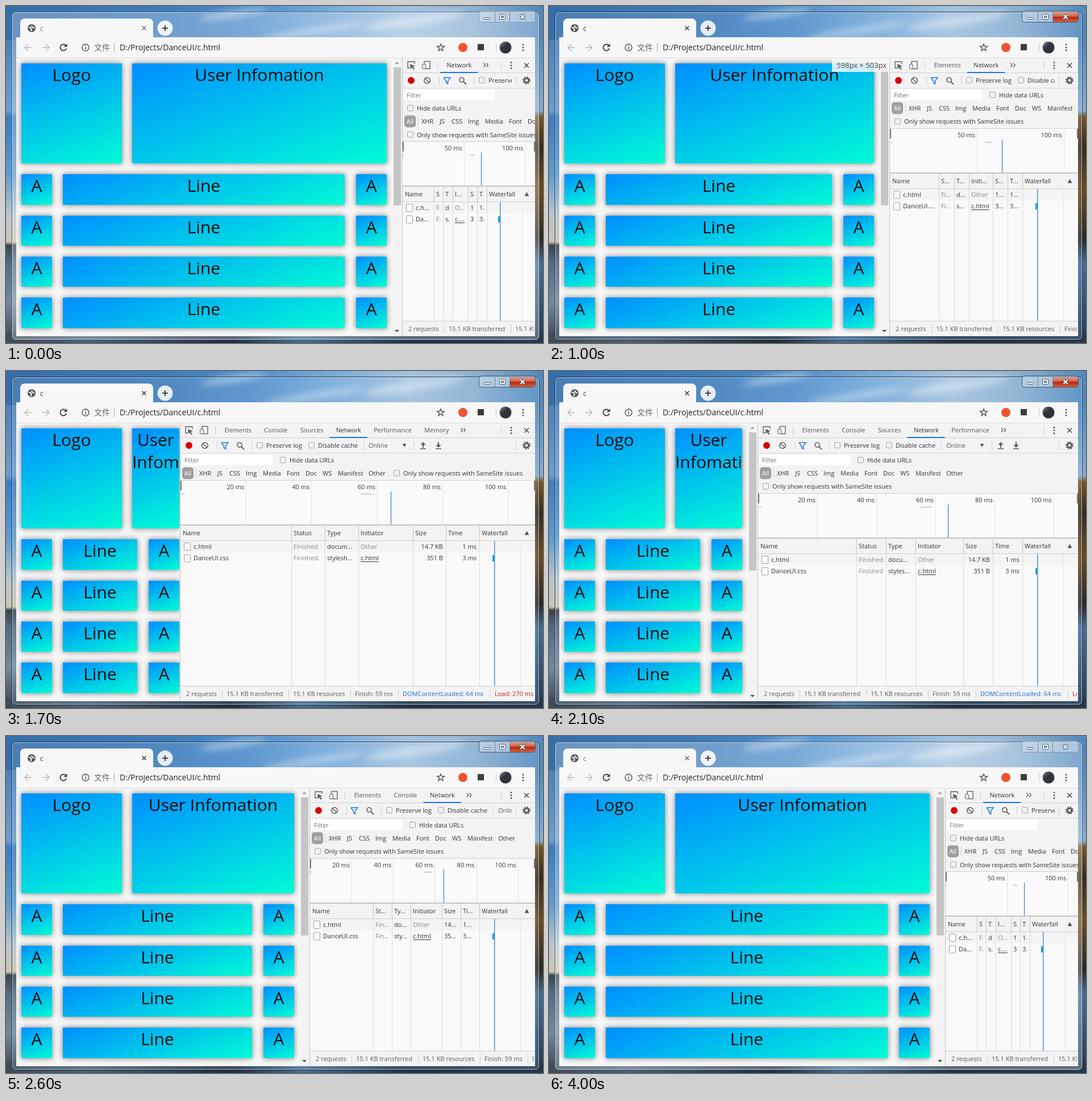
Animation of 945 by 593 pixels, one loop 4.1 s. Source, as an HTML page with a canvas:

```html
<!DOCTYPE html>
<html lang="en">
<head>
<meta charset="utf-8">
<title>c</title>
<style>
html, body { margin: 0; width: 100%; height: 100%; overflow: hidden; }
canvas { display: block; }
</style>
</head>
<body>
<canvas id="stage" width="945" height="593"></canvas>
<script>
const c = document.getElementById('stage').getContext('2d');
const FONT = '"Open Sans", "Noto Sans", "Noto Sans CJK SC", sans-serif';
const RIGHT = 931, BOTTOM = 581, REST = 698;

// Splitter position for every 100 ms of the drag, which begins at 600 ms.
const DRAG = [698, 698, 696, 668, 600, 440, 333, 317, 309, 306, 305, 307, 312,
  322, 342, 368, 396, 426, 459, 495, 535, 584, 632, 674, 692, 698];

function rect(x, y, w, h, color) {
  c.fillStyle = color;
  c.fillRect(x, y, w, h);
}
const vline = (x, y1, y2, color = '#ccc') => rect(Math.round(x), y1, 1, y2 - y1, color);

function round(x, y, w, h, r, fill, stroke) {
  c.beginPath();
  c.roundRect(x, y, w, h, r);
  if (fill) { c.fillStyle = fill; c.fill(); }
  if (stroke) { c.strokeStyle = stroke; c.lineWidth = 1; c.stroke(); }
}

function disc(x, y, r, fill) {
  c.beginPath();
  c.arc(x, y, r, 0, 7);
  c.fillStyle = fill;
  c.fill();
}

function ring(x, y, r, color, width = 1.5, from = 0, to = 2 * Math.PI) {
  c.beginPath();
  c.arc(x, y, r, from, to);
  c.strokeStyle = color;
  c.lineWidth = width;
  c.stroke();
}

// Polyline through x, y pairs given relative to an origin.
function path(x, y, pts, color, width) {
  c.beginPath();
  for (let i = 0; i < pts.length; i += 2) c.lineTo(x + pts[i], y + pts[i + 1]);
  if (width) { c.strokeStyle = color; c.lineWidth = width; c.stroke(); }
  else { c.fillStyle = color; c.fill(); }
}

function cross(x, y, r, color, width = 1.5) {
  path(x, y, [-r, -r, r, r], color, width);
  path(x, y, [-r, r, r, -r], color, width);
}

const dots = (x, y, color) => [-5, 0, 5].forEach(d => disc(x, y + d, 1.5, color));

function setFont(size) { c.font = `${size}px ${FONT}`; }

// y is the middle of the capitals.
function text(s, x, y, color = '#333', size = 11, align = 'left') {
  setFont(size);
  c.textAlign = align;
  c.fillStyle = color;
  c.fillText(s, x, Math.round(y + size * .36));
}

function width(s, size = 11) {
  setFont(size);
  return c.measureText(s).width;
}

function clip(x, y, w, h, draw) {
  c.save();
  c.beginPath();
  c.rect(x, y, w, h);
  c.clip();
  draw();
  c.restore();
}

function blend(x0, y0, x1, y1, stops) {
  const g = c.createLinearGradient(x0, y0, x1, y1);
  for (const [at, color] of stops) g.addColorStop(at, color);
  return g;
}

function check(x, y, label) {
  round(x - 4.5, y - 5.5, 10, 10, 2, '#f1f1f1', '#a0a0a0');
  text(label, x + 12, y);
}

/* Desktop and window frame */

function desktop() {
  rect(0, 0, 945, 593, blend(0, 0, 0, 593, [[0, '#3c74af'], [.31, '#6b9ecf'], [.33, '#3a7dbf'],
    [.5, '#5f9cd0'], [.62, '#b9c6cb'], [.7, '#cdc5ae'], [.71, '#3a434d'], [.76, '#526b82'],
    [.88, '#75899a'], [1, '#33414f']]));
  rect(0, 0, 945, 60, blend(0, 0, 945, 0, [[0, '#346eab'], [.3, '#3f7cba'], [.45, '#4d8cca'],
    [.6, '#76a9d8'], [.75, '#a3c3de'], [.88, '#8aafd0'], [1, '#5087bd']]));
  rect(925, 55, 20, 538, blend(0, 55, 0, 593, [[0, '#5088be'], [.24, '#86aed2'], [.26, '#7d5522'],
    [.36, '#3a2a18'], [.5, '#6f4b20'], [.66, '#2b2820'], [.74, '#456f98'], [1, '#23394f']]));
  rect(0, 575, 945, 18, blend(0, 0, 945, 0, [[0, '#3d4b58'], [.15, '#4b6074'], [.34, '#2a3c4e'],
    [.42, '#1f2e3f'], [.55, '#466d90'], [.75, '#1f3145'], [1, '#26394c']]));
  c.save();
  c.filter = 'blur(6px)';
  c.fillStyle = 'rgba(255,255,255,.4)';
  for (const [x, y, rx, ry] of [[400, 14, 60, 7], [540, 44, 90, 6], [720, 26, 90, 10]]) {
    c.beginPath();
    c.ellipse(x, y, rx, ry, -.15, 0, 7);
    c.fill();
  }
  c.restore();
}

function frame(active) {
  round(10.5, 10.5, 928, 577, 7, active ? 'rgba(190,215,240,.15)' : 'rgba(235,243,250,.28)',
    active ? '#1e2e40' : '#4a5d70');
  round(11.5, 11.5, 926, 575, 6, null, 'rgba(255,255,255,.6)');
  round(832.5, 8.5, 99, 20, 4, 'rgba(225,236,246,.45)', active ? '#43566a' : '#8497aa');
  if (active) round(887, 11, 44, 17, [0, 0, 4, 0],
    blend(0, 11, 0, 28, [[0, '#e2a090'], [.45, '#cf5a42'], [.5, '#b5260f'], [1, '#d5603f']]));
  vline(860, 11, 28, '#71859a');
  vline(886, 11, 28, '#71859a');
  round(841.5, 20.5, 11, 3, 1, '#fff', '#4a5562');
  round(868.5, 14.5, 10, 9, 1, '#fff', '#4a5562');
  round(871.5, 17.5, 4, 3, 0, '#9cb2c8', '#4a5562');
  cross(909, 19, 4, '#4a5562', 4);
  cross(909, 19, 3.5, '#fff', 2.2);
}

function browserBar(active) {
  const ink = '#50545a', soft = '#bcbec1';
  round(25, 22, 234, 40, [8, 8, 0, 0], '#f7f7f7');
  rect(18, 55, 913, 37, '#f7f7f7');
  rect(18, 91, 913, 1, '#dcdcdc');

  disc(45, 39, 7, ink);
  path(45, 39, [-5, -2, -1, 0, 0, 3, -2, 5], '#f7f7f7', 2);
  path(45, 39, [0, -5, 1, -2, 5, 0], '#f7f7f7', 2);
  text('c', 60, 40, active ? '#333' : '#777', 12);
  cross(243, 39, 3.5, active ? '#333' : '#666');
  disc(280, 39, 13.5, active ? '#e6edf4' : '#f0f4f8');
  path(280, 39, [-5, 0, 5, 0], '#333', 1.8);
  path(280, 39, [0, -5, 0, 5], '#333', 1.8);

  for (const [x, d] of [[39, -1], [70, 1]]) {
    path(x, 73, [-6 * d, 0, 6 * d, 0], soft, 1.7);
    path(x, 73, [0, -6, 6 * d, 0, 0, 6], soft, 1.7);
  }
  ring(101, 73, 5.5, '#444', 1.9, .3, 5.4);
  path(101, 73, [6.5, -7, 6.5, -1, .5, -1], '#444');
  ring(140, 73, 6, ink, 1.4);
  rect(139.3, 72, 1.5, 4.5, ink);
  rect(139.3, 69.3, 1.5, 1.6, ink);
  text('文件', 155, 73, '#666', 14);
  vline(190, 65, 81, '#aaa');
  text('D:/Projects/DanceUI/c.html', 200, 73, '#222', 14);

  const star = [];
  for (let i = 0; i <= 10; i++) {
    const r = i % 2 ? 2.8 : 6.8, a = i * Math.PI / 5 - Math.PI / 2;
    star.push(r * Math.cos(a), r * Math.sin(a));
  }
  path(765, 73, star, ink, 1.4);
  disc(804, 73, 8, '#f0522f');
  rect(830, 67, 11, 11, '#3c3c3c');
  vline(862, 65, 81);
  disc(879, 73, 10.5, blend(870, 63, 888, 83, [[0, '#6f7d88'], [.4, '#30363e'], [1, '#2a3038']]));
  dots(910, 73, ink);
}

/* Web page */

function card(x, y, w, h, label) {
  const cx = x + w / 2, cy = y + h / 2, sin = .342, cos = .94;
  const half = (w * sin + h * cos) / 2;
  c.save();
  c.shadowColor = 'rgba(0,0,0,.5)';
  c.shadowBlur = 10;
  rect(x, y, w, h, blend(cx - sin * half, cy - cos * half, cx + sin * half, cy + cos * half,
    [[0, '#008eff'], [1, '#00fcd6']]));
  c.restore();
  const lines = width(label, 30) > w ? label.split(' ') : [label];
  clip(x, y, w, h, () => lines.forEach((line, i) => {
    const fits = width(line, 30) <= w;
    text(line, fits ? cx : x, y + 20.2 + 39 * i, '#0a0a0a', 30, fits ? 'center' : 'left');
  }));
}

function sizeLabel(split) {
  const size = [split - 18, BOTTOM - 92].map(n => Math.round(n * 1.028) + 'px').join(' × ');
  rect(split - 102, 92, 100, 24, 'rgba(247,247,247,.85)');
  text(size, split - 6, 104.5, '#444', 13, 'right');
}

function page(split, resizing) {
  const end = Math.max(split, 333);
  rect(18, 92, split - 18, BOTTOM - 92, '#f7f7f7');
  clip(18, 92, split - 19, BOTTOM - 92, () => {
    card(27, 101, 177, 176, 'Logo');
    card(222, 101, end - 250, 176, 'User Infomation');
    for (let i = 0; i < 4; i++) {
      const exact = 296.3 + 72.3 * i;
      const y = Math.round(exact), h = Math.round(exact + 53.5) - y;
      card(27, y, 54, h, 'A');
      card(100, y, end - 202, h, 'Line');
      card(end - 82, y, 54, h, 'A');
    }
    rect(end - 17, 92, 17, BOTTOM - 92, '#f3f3f3');
    rect(end - 16, 108, 13, 243, '#c5c5c5');
    path(end - 10, 100, [-4, 2, 0, -2, 4, 2], '#a3a3a3');
    path(end - 10, 572, [-4, -2, 0, 2, 4, -2], '#505050');
    if (resizing) sizeLabel(split);
  });
}

/* Network panel */

function tabBar(P, W) {
  const ink = '#5a5a5a';
  path(P + 15, 104, [6, -2, 6, -6, -6, -6, -6, 5, -2, 5], ink, 1.3);
  path(P + 15, 104, [-2, -2, 7, 2, 3, 3, 6, 7, 4, 8, 1, 4, -1, 7], ink);
  c.strokeStyle = ink;
  c.lineWidth = 1.3;
  c.strokeRect(P + 38, 97.5, 10, 13);
  round(P + 34.5, 102.5, 6, 8, 1, '#f3f3f3', ink);
  vline(P + 61, 97, 112);

  const all = ['Elements', 'Console', 'Sources', 'Network', 'Performance', 'Memory'];
  const size = s => width(s) + 22.5;
  let room = W - 165 - size('Network'), open = true, x = P + 66;
  for (const name of all) {
    const w = size(name), current = name === 'Network';
    if (!current) {
      open = open && w <= room;
      if (!open) continue;
      room -= w;
    }
    text(name, x + 11.5, 104.5, current ? '#333' : '#555');
    if (current) rect(x, 116, w, 2, '#1a73e8');
    x += w;
  }
  for (const d of [-4, 1]) path(x + 14 + d, 104, [0, -3.5, 3, 0, 0, 3.5], ink, 1.3);
  vline(871, 97, 112);
  dots(889, 104.5, ink);
  cross(916, 104.5, 4, '#444');
}

function toolBar(P) {
  const ink = '#5a5a5a', y = 131;
  disc(P + 15, y, 6, '#d90000');
  ring(P + 43, y, 5.3, ink, 1.6);
  path(P + 43, y, [-3.7, -3.7, 3.7, 3.7], ink, 1.6);
  path(P + 78, y, [-6, -5, 6, -5, 1.5, 1, 1.5, 6, -1.5, 4, -1.5, 1, -6, -5], '#1a73e8', 1.5);
  ring(P + 104, y - 1, 4, ink, 1.6);
  path(P + 107, y + 2, [0, 0, 5, 5], ink, 1.8);
  for (const d of [64, 125, 322, 411]) vline(P + d, 124, 139);
  clip(P, 118, 890 - P, 27, () => {
    check(P + 139, y, 'Preserve log');
    check(P + 230, y, 'Disable cache');
    text('Online', P + 331, y, '#555');
    path(P + 394, y, [-3.5, -3, 3.5, -3, 0, 3], ink);
    for (const [x, d] of [[427, -1], [454, 1]]) {
      path(P + x, y - 1, [0, -5 * d, 0, 2 * d], ink, 2.2);
      path(P + x, y - 1, [-4.5, 0, 4.5, 0, 0, 5 * d], ink);
      rect(P + x - 5, y + 5, 10, 1.5, ink);
    }
  });
  rect(897, 120, 34, 23, '#f3f3f3');
  vline(897, 124, 139);
  ring(916, 131, 3.8, ink, 2.8);
  c.setLineDash([2.4, 2.3]);
  ring(916, 131, 6, ink, 2);
  c.setLineDash([]);
}

// Returns the bottom edge of the wrapping filter rows.
function filters(P, W) {
  let row = 0;
  const mid = () => 157 + 23.2 * row;
  rect(P + 2, 147, 160, 19, '#fff');
  text('Filter', P + 7, 157.5, '#757575');
  if (W < 280) row++;
  check(P + (row ? 13 : 180), mid(), 'Hide data URLs');
  row++;
  round(P + 3, mid() - 11, 20, 21, 5, '#9f9f9f');
  text('All', P + 13, mid(), '#fff', 11, 'center');
  vline(P + 27, mid() - 8, mid() + 7);
  const types = { XHR: 33, JS: 65, CSS: 86, Img: 115, Media: 145, Font: 187, Doc: 220, WS: 250, Manifest: 277, Other: 331 };
  for (const name in types)
    if (name !== 'Other' || W > 365) text(name, P + types[name], mid());
  const wrap = W < 604;
  if (wrap) row++;
  check(P + (wrap ? 13 : 380), mid(), 'Only show requests with SameSite issues');
  return 169 + 23 * row;
}

function overview(P, W, top, hover) {
  const at = ms => P + ms * W / 108.3, step = W < 350 ? 50 : 20;
  rect(P, top, W, 78, '#fafafa');
  rect(P, top, W, 1, '#d0d0d0');
  for (let ms = step; ms <= 100; ms += step) {
    vline(at(ms), top, top + 78, '#e2e2e2');
    text(ms + ' ms', at(ms) - 3, top + 12.5, '#333', 11, 'right');
  }
  rect(P, top + 24, at(1.4) - P, 1, '#aaa');
  rect(at(55), top + 24, at(58.8) - at(55), 1, '#aaa');
  vline(at(64.3), top + 20, top + 78, '#1f66c9');
  rect(P, top + 1, 2, 17, '#777');
  rect(RIGHT - 2, top + 1, 2, 17, '#777');
  if (hover) rect(842, top + 1, 2, 77, 'hsla(220,95%,50%,.7)');
  rect(P, top + 78, W, 2, '#c4c4c4');
}

// Text cut with an ellipsis, as in a narrow table cell.
function cell(s, x, w, y, color, alignRight, line) {
  let n = s.length, shown = s;
  while (n > 1 && width(shown) > w) shown = s.slice(0, --n).trim() + '...';
  clip(x, y - 9, w, 18, () => {
    const right = alignRight && shown === s;
    text(shown, right ? x + w : x, y, color, 11, right ? 'right' : 'left');
    if (line) rect(x, Math.round(y + 5), width(shown), 1, color);
  });
}

function table(P, W, top) {
  const R = Math.max(833, P + 148), floor = 554, first = top + 27;
  const cols = [0, .371, .483, .595, .777, .888, 1].map(f => Math.round(P + f * (R - P)));
  const rows = [
    ['Name', 'Status', 'Type', 'Initiator', 'Size', 'Time'],
    ['c.html', 'Finished', 'document', 'Other', '14.7 KB', '1 ms'],
    ['DanceUI.css', 'Finished', 'stylesheet', 'c.html', '351 B', '3 ms']];
  rect(P, first, W, floor - first, '#f9f9f9');
  rect(P, first, W, 20, '#f4f4f4');
  rect(P, top, W, 26, '#f3f3f3');
  rect(P, top + 26, W, 1, '#cfcfcf');
  for (const x of cols.slice(1)) {
    vline(x, top, first, '#c4c4c4');
    vline(x, first, floor, '#dadada');
  }
  rows.forEach((row, r) => {
    const y = r ? top + 16.5 + 20.5 * r : top + 13.5;
    row.forEach((s, i) => {
      const icon = r && !i, pad = icon ? 23 : 4, gap = r ? 5 : 6;
      const gray = r && (s === 'Finished' || s === 'Other');
      cell(s, cols[i] + pad, cols[i + 1] - cols[i] - pad - gap, y, gray ? '#888' : '#333', r && i > 3, r === 2 && i === 3);
      if (icon) round(P + 6.5, y - 6.5, 11, 13, 1, '#fff', '#999');
    });
  });
  text('Waterfall', R + 4, top + 13.5);
  path(916.5, top + 13, [-4, 3.5, 0, -3.5, 4, 3.5], '#555');
  const load = Math.round(R + .266 * (RIGHT - R));
  vline(R + .735 * (RIGHT - R), first, floor, '#dfe6ea');
  rect(load, first, 1.5, floor - first, '#4d90dc');
  rect(load - 3, top + 52, 3, 11, '#1a9fe0');
}

function footer(P, W) {
  rect(P, 554, W, 27, '#f3f3f3');
  rect(P, 554, W, 1, '#cfcfcf');
  const items = [['2 requests', 10], ['15.1 KB transferred', 81], ['15.1 KB resources', 198],
    ['Finish: 59 ms', 307], ['DOMContentLoaded: 64 ms', 391, '#1a6fd0'], ['Load: 270 ms', 553, '#c5221f']];
  clip(P, 555, 929 - P, 26, () => items.forEach(([s, x, color = '#5a5a5a'], i) => {
    text(s, P + x, 568.5, color);
    if (i) vline(P + x - 8, 561, 576);
  }));
}

function panel(P, hover) {
  const W = RIGHT - P;
  clip(P - 1, 92, W + 1, BOTTOM - 92, () => {
    rect(P - 1, 92, W + 1, BOTTOM - 92, '#f3f3f3');
    rect(P, 117, W, 1, '#cfcfcf');
    rect(P, 144, W, 1, '#d6d6d6');
    tabBar(P, W);
    toolBar(P);
    const top = filters(P, W);
    overview(P, W, top, hover);
    table(P, W, top + 80);
    footer(P, W);
    vline(P - 1, 92, BOTTOM, '#c4c4c4');
  });
}

function draw(now) {
  const tick = Math.floor(now % 4100 / 100);
  const active = tick >= 6 && tick < 40;
  const split = DRAG[tick - 6] ?? REST;
  desktop();
  frame(active);
  browserBar(active);
  page(split, tick >= 9 && tick < 12);
  panel(split, tick === 1);
}

let start;
function loop(now) {
  start ??= now;
  draw(now - start);
  requestAnimationFrame(loop);
}
draw(0);
requestAnimationFrame(loop);
</script>
</body>
</html>
```
